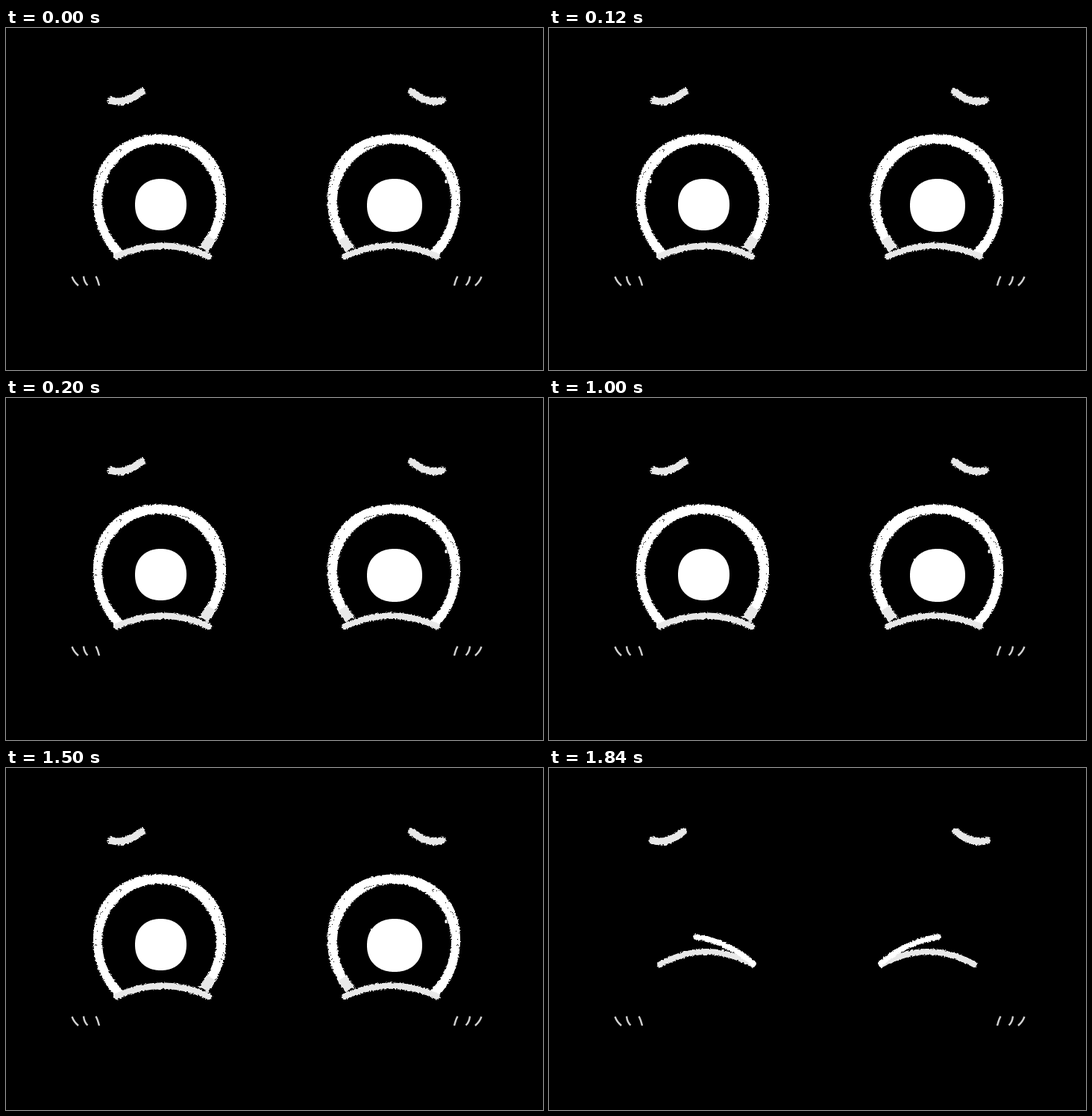
Animation of 720x458 px, one loop 2040 ms. Source, as an HTML page:

```html
<!DOCTYPE html>
<html lang="en">
<head>
<meta charset="utf-8">
<title>Blinking eyes</title>
<style>
html, body { margin: 0; width: 100%; height: 100%; overflow: hidden; background: #000; }
svg { display: block; width: 720px; height: 458px; }
</style>
</head>
<body>
<svg viewBox="0 0 720 458" xmlns="http://www.w3.org/2000/svg" fill="none" stroke-linecap="round">
  <defs>
    <filter id="chalk" filterUnits="userSpaceOnUse" x="0" y="0" width="720" height="458" color-interpolation-filters="sRGB">
      <feTurbulence type="fractalNoise" baseFrequency="0.4" numOctaves="2" seed="7"/>
      <feDisplacementMap in="SourceGraphic" scale="4" xChannelSelector="R" yChannelSelector="G"/>
    </filter>
  </defs>
  <rect width="720" height="458" fill="#000"/>
  <g id="brows" filter="url(#chalk)"></g>
  <g id="open">
    <g id="rims" filter="url(#chalk)"></g>
    <g id="marks"></g>
  </g>
  <g id="closed" filter="url(#chalk)"></g>
  <g id="blush"></g>
</svg>
<script>
const LOOP = 2040, DOT_END = 200, NICK_START = 1000, BLINK_START = 1840;
const WHITE = '#fff', GREY = '#e8e8e8';
const $ = id => document.getElementById(id);

function add(parent, d, attrs) {
  const p = document.createElementNS('http://www.w3.org/2000/svg', 'path');
  p.setAttribute('d', d);
  for (const k in attrs) p.setAttribute(k, attrs[k]);
  $(parent).appendChild(p);
  return p;
}

const mirror = sum => sum ? `translate(${sum} 0) scale(-1 1)` : '';

// Adds a path and its reflection about x = sum / 2
const pair = (parent, d, attrs, sum = 726) =>
  [0, sum].map(s => add(parent, d, { ...attrs, transform: mirror(s) }));

const brush = (color, width) => ({ stroke: color, 'stroke-width': width });

// Points on a superellipse, clockwise on screen, angles in degrees
function arc(cx, cy, rx, top, bottom, power, from = 0, to = 360) {
  const pts = [], steps = 90;
  const bend = (v, p) => Math.sign(v) * Math.abs(v) ** (2 / p);
  for (let i = 0; i <= steps; i++) {
    const a = (from + (to - from) * i / steps) * Math.PI / 180;
    const s = Math.sin(a), p = s < 0 ? power : 2;
    pts.push([cx + rx * bend(Math.cos(a), p), cy + (s < 0 ? top : bottom) * bend(s, p)]);
  }
  return pts;
}

const poly = pts => 'M' + pts.map(p => p.map(v => v.toFixed(1))).join('L') + 'Z';

function disc(cx, cy, rx, ry) {
  const half = arc(cx, cy, rx, ry, ry, 2.2, 180, 360);
  return poly([...half, ...half.map(([x, y]) => [2 * cx - x, 2 * cy - y])]);
}

// Sparse dark grain: the worn outer edge, then the seam under the top
function grain() {
  let seed = 11, d = '';
  const rnd = () => (seed = seed * 16807 % 2147483647) / 2147483647;
  const speck = (x, y) => d += `M${Math.round(x)} ${Math.round(y)}h1v1h-1z`;
  for (let i = 0; i < 36; i++) {
    const a = (i % 2 ? 175 + rnd() * 60 : rnd() * 60 - 40) * Math.PI / 180;
    const r = 88 - rnd() * 4;
    speck(206 + r * Math.cos(a), 230 + r * Math.sin(a));
  }
  for (let i = 0; i < 24; i++) {
    const t = rnd();
    speck(207 + 38 * t, 153.5 + 6 * t * t + rnd() * 2);
  }
  return d;
}

const rim = poly([
  ...arc(206, 231, 89, 88.5, 100, 2.2, 131, 400),
  ...arc(205.5, 232, 76.5, 77, 85, 2, 407, 128)
]);

const brows = pair('brows', 'M141 97Q161 103 182 85', brush(GREY, 10));

pair('rims', rim, { fill: WHITE });
pair('rims', 'M275 281Q270 290 265 296', { ...brush(GREY, 14), 'stroke-linecap': 'butt' });
pair('rims', 'M148 306Q210 277 272 306', brush(GREY, 8.5));

pair('marks', grain(), { fill: '#000' });
add('marks', disc(207.5, 236.5, 34.5, 34.5), { fill: WHITE });
add('marks', disc(521, 237.5, 37, 35.5), { fill: WHITE });
const [dot] = pair('marks', 'M136 204.5v2', brush(WHITE, 3));
const nick = add('marks', 'M489 215h1v3h-1z', { fill: WHITE });

pair('closed', 'M149 263Q211 229 273 263', brush(GREY, 8), 719);
pair('closed', 'M197 226Q244 234 274 262', brush(WHITE, 7.5), 719);

pair('blush', 'M88.5 333Q91 340 97 345M104 332.5Q105 341 109.5 344.5M120.5 332.5Q123 337 125 345',
  { ...brush('#d0d0d0', 2.4), 'stroke-linecap': 'butt' });

const show = (el, on) => el.setAttribute('display', on ? 'inline' : 'none');

function draw(t) {
  const shut = t >= BLINK_START;
  show($('open'), !shut);
  show($('closed'), shut);
  show(dot, t < DOT_END);
  show(nick, t >= NICK_START);
  // The brows spread outwards a little during the blink
  brows.forEach((b, i) => b.setAttribute('transform', `${mirror(i * 726)} translate(${shut ? -2 : 0} 0)`));
}

const start = performance.now();
function tick() {
  draw((performance.now() - start) % LOOP);
  requestAnimationFrame(tick);
}
draw(0);
requestAnimationFrame(tick);
</script>
</body>
</html>
```
